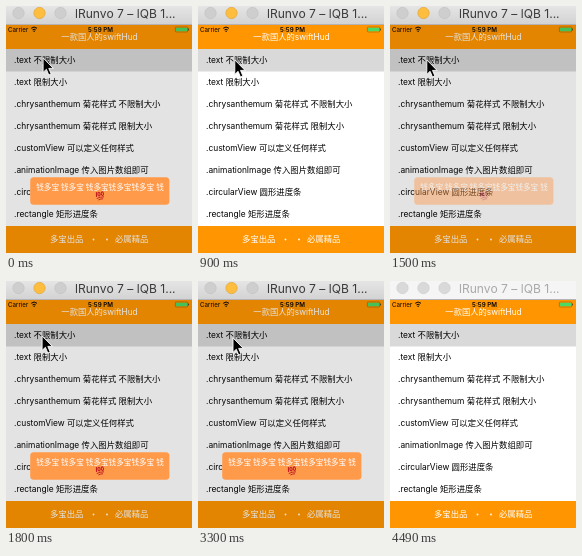
These frames come from a looping animation (186x247 px, 4.59 s). An HTML page:

```html
<!DOCTYPE html>
<html lang="zh">
<head>
<meta charset="utf-8">
<title>swiftHud</title>
<style>
  html, body { margin: 0; width: 100%; height: 100%; overflow: hidden; background: #fff; }
  svg { display: block; width: 100vw; height: 100vh; }
  text { font-family: Inter, "Noto Sans CJK SC", "Noto Sans CJK", sans-serif; font-size: 8.4px; white-space: pre; }
  .white { fill: #fff; }
  .mid { text-anchor: middle; }
  .status { font-size: 6.2px; }
</style>
</head>
<body>
<svg viewBox="0 0 186 247" preserveAspectRatio="none">
  <defs>
    <linearGradient id="chrome" x2="0" y2="1">
      <stop stop-color="#e6e5e6"/>
      <stop offset="1" stop-color="#d3d2d3"/>
    </linearGradient>
  </defs>

  <g id="app">
    <rect y="19" width="186" height="228" fill="#fff"/>
    <rect y="19" width="186" height="24" fill="#ff9500"/>
    <rect y="43" width="186" height="22.5" fill="#d9d9d9"/>
    <rect y="220" width="186" height="27" fill="#ff9500"/>

    <text class="status" x="2" y="25.6">Carrier</text>
    <g fill="none" stroke="#000" stroke-width="1">
      <path d="M25.2 22.3q2.9-2.6 5.8 0M26.5 23.9q1.6-1.4 3.2 0"/>
    </g>
    <circle cx="28.1" cy="25.2" r=".7"/>
    <text class="status mid" x="94.5" y="25.6" font-weight="600">5:59 PM</text>
    <rect x="169.3" y="21" width="12.4" height="5" rx="1" fill="none" stroke="#000" stroke-opacity=".45" stroke-width=".5"/>
    <rect x="170" y="21.7" width="11" height="3.6" rx=".4" fill="#4cd964"/>
    <rect x="182.2" y="22.6" width=".8" height="1.8" fill="#333"/>

    <text class="white mid" x="93.5" y="34" style="font-size:8.3px">一款国人的swiftHud</text>
    <g id="rows"></g>
    <text class="white" x="44" y="236">多宝出品</text>
    <circle class="white" cx="87.5" cy="233.5" r=".9"/>
    <circle class="white" cx="101" cy="233.5" r=".9"/>
    <text class="white" x="109" y="236">必属精品</text>
  </g>

  <rect id="dim" y="19" width="186" height="228" fill="#000" opacity=".11"/>

  <g id="toast">
    <rect x="24.2" y="171.2" width="139.2" height="27.5" rx="3.5" fill="#ff9a4b"/>
    <text class="white mid" x="94" y="183.6" font-weight="500" style="font-size:7.6px">钱多宝 钱多宝 钱多宝钱多宝钱多宝 钱</text>
    <g transform="translate(94 189.7) rotate(-8)" fill="none" stroke="#c31f23" stroke-linecap="round">
      <path d="M-3.1-3.6L-3.5.3" stroke-width="1.2"/>
      <ellipse cx="-.8" cy="-1.7" rx="1.1" ry="1.8" stroke-width="1.1"/>
      <ellipse cx="2.6" cy="-1.7" rx="1.1" ry="1.8" stroke-width="1.1"/>
      <path d="M-3.2 2.2Q0 1.3 3.4 1.6M-1.8 3.9Q.2 3.2 2.2 3.4" stroke-width=".9"/>
    </g>
  </g>

  <rect id="bar" width="186" height="19"/>
  <rect y="18" width="186" height="1" fill="#b4b2b4"/>
  <g id="buttons" stroke-width=".6">
    <circle cx="12.5" cy="7" r="5.7"/>
    <circle cx="33.5" cy="7" r="5.7"/>
    <circle cx="54.5" cy="7" r="5.7"/>
  </g>
  <text id="title" x="69" y="11.9" style="font-size:12.1px">lRunvo 7 – lQB 1...</text>

  <path id="cursor" d="M.6.9V15.4L3.9 12.3 6.3 18 8.7 17 6.3 11.4H10.9Z" stroke="#fff" stroke-width=".9" stroke-linejoin="round"/>
</svg>
<script>
const LOOP = 4590;
const $ = id => document.getElementById(id);

const labels = [
  '.text 不限制大小',
  '.text 限制大小',
  '.chrysanthemum 菊花样式 不限制大小',
  '.chrysanthemum 菊花样式 限制大小',
  '.customView 可以定义任何样式',
  '.animationImage 传入图片数组即可',
  '.circularView 圆形进度条',
  '.rectangle 矩形进度条'
];
$('rows').innerHTML = labels
  .map((s, i) => `<text x="8" y="${57.2 + 22 * i}">${s}</text>`).join('');

// Each track holds its value until the next time.
const toastTrack = [[0, 1], [450, 0], [1350, .11], [1500, .45], [1650, .82], [1800, 1], [3600, 0]];
const cursorTrack = [
  [0, [36.5, 51]], [900, [36.2, 53]], [1800, [35.5, 54]],
  [2400, [35, 55]], [3300, [34.4, 56]], [3740, [35, 64.3]], [3890, null]
];

function at(track, t) {
  let value = track[0][1];
  for (const [time, v] of track) if (t >= time) value = v;
  return value;
}

function set(id, attrs) {
  for (const k in attrs) $(id).setAttribute(k, attrs[k]);
}

function draw(t) {
  const alpha = at(toastTrack, t);
  const pos = at(cursorTrack, t);
  const active = t < 4490;

  set('toast', { opacity: alpha });
  set('dim', { opacity: alpha > 0 ? .11 : 0 });
  set('cursor', pos
    ? { visibility: 'visible', transform: `translate(${pos})` }
    : { visibility: 'hidden' });

  set('bar', { fill: active ? 'url(#chrome)' : '#f5f5f5' });
  set('title', { fill: active ? '#3a3a3a' : '#a9a9a9' });
  [...$('buttons').children].forEach((dot, i) => {
    const lit = active && i === 1;
    dot.setAttribute('fill', lit ? '#fdbd3f' : active ? '#cfcecf' : '#d9d9d9');
    dot.setAttribute('stroke', lit ? '#dfa033' : active ? '#c0bfc0' : '#cacaca');
  });
}

const start = performance.now();
function tick() {
  draw((performance.now() - start) % LOOP);
  requestAnimationFrame(tick);
}
tick();
</script>
</body>
</html>
```
